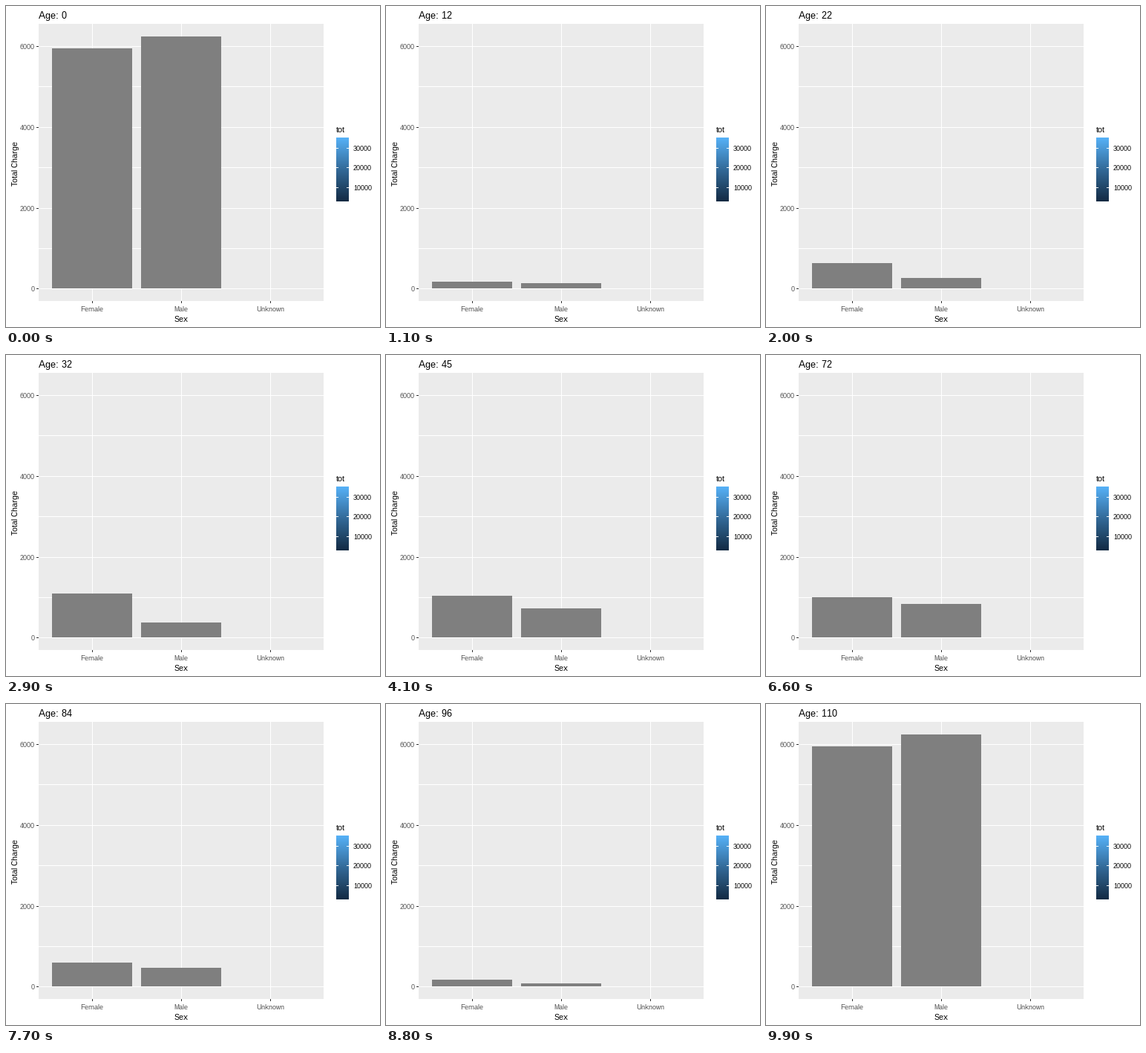
These frames come from a looping animation (504x432 px, 10000 ms). A matplotlib script:

```python
import matplotlib.pyplot as plt
import numpy as np
from matplotlib.animation import FuncAnimation
from matplotlib.colors import LinearSegmentedColormap
from matplotlib.patches import Rectangle

W, H = 504, 432
LEFT, RIGHT, TOP, BOTTOM = 44, 428, 24, 397
ZERO, PX_PER_UNIT = 380.9, 0.0544
BASE = int(ZERO)
BAR_W, BAR_STEP = 108, 120
FRAMES, INTERVAL = 100, 100

# Two of the ages have no records, so the last steps skip ahead.
AGES = [a for a in range(111) if a not in (107, 109)]
LAST = len(AGES) - 1

# Charges run straight between a few key ages; newborns stand apart.
KEY_AGES = (1, 6, 12, 32, 57, 72, 96, 107)
FEMALE = (220, 80, 166, 1086, 975, 994, 166, 0)
MALE = (240, 60, 129, 368, 1030, 828, 74, 0)
NEWBORN = (5945, 6240)

plt.rcParams.update({
    "font.family": "Liberation Sans",
    "text.hinting": "native",
    "text.hinting_factor": 1,
})

fig = plt.figure(figsize=(W / 72, H / 72), dpi=72, facecolor="white")
ax = fig.add_axes([0, 0, 1, 1])
ax.axis("off")


def box(x, y, w, h, color, z=1):
    patch = Rectangle((x, y), w, h, facecolor=color, linewidth=0,
                      antialiased=False, zorder=z)
    return ax.add_patch(patch)


def label(x, y, text, size, color="black", **kw):
    return ax.text(x, y, text, fontsize=size, color=color,
                   va="baseline", zorder=5, **kw)


def draw_panel():
    box(LEFT, TOP, RIGHT - LEFT, BOTTOM - TOP, "#EBEBEB")
    for value in range(0, 7000, 1000):
        y = int(ZERO - value * PX_PER_UNIT)
        box(LEFT, y, RIGHT - LEFT, 1, "white", 2)
        if value % 2000 == 0:
            box(LEFT - 3, y, 3, 1, "#333333", 2)
            label(39, y + 4, str(value), 9, "#4D4D4D", ha="right")
    for i, name in enumerate(("Female", "Male", "Unknown")):
        x = 116 + BAR_STEP * i
        box(x, TOP, 1, BOTTOM - TOP, "white", 2)
        box(x, BOTTOM, 1, 3, "#333333", 2)
        label(x, 411, name, 9, "#4D4D4D", ha="center")
    label(236, 425, "Sex", 11, ha="center")
    label(16, 211.5, "Total Charge", 11, ha="center",
          rotation=90, rotation_mode="anchor")


def draw_legend():
    blues = LinearSegmentedColormap.from_list(
        "blues", ["#132B43", "#336A98", "#56B1F7"])
    ramp = np.linspace(1, 0, 86)[:, None]
    ax.imshow(ramp, cmap=blues, extent=(445, 462, 263, 177),
              aspect="auto", interpolation="nearest", zorder=2)
    label(445, 170, "tot", 11)
    for value in (10000, 20000, 30000):
        y = int(271 - value * 0.00266)
        for x in (445, 459):
            box(x, y, 3, 1, "white", 3)
        label(468, y + 4, str(value), 9)


def charges(step):
    if step % LAST == 0:
        return NEWBORN
    return [np.interp(step, KEY_AGES, keys) for keys in (FEMALE, MALE)]


draw_panel()
draw_legend()
title = label(LEFT, 17, "", 13)
bars = [box(62 + BAR_STEP * i, BASE, BAR_W, 0, "#7F7F7F", 4)
        for i in range(2)]
ax.set_xlim(0, W)
ax.set_ylim(H, 0)


def update(i):
    step = round(i * LAST / (FRAMES - 1))
    title.set_text(f"Age: {AGES[step]}")
    for bar, charge in zip(bars, charges(step)):
        height = round(charge * PX_PER_UNIT)
        bar.set_bounds(bar.get_x(), BASE - height, BAR_W, height)
    return [title, *bars]


anim = FuncAnimation(fig, update, frames=FRAMES, interval=INTERVAL,
                     repeat=True, repeat_delay=0)
plt.show()
```
